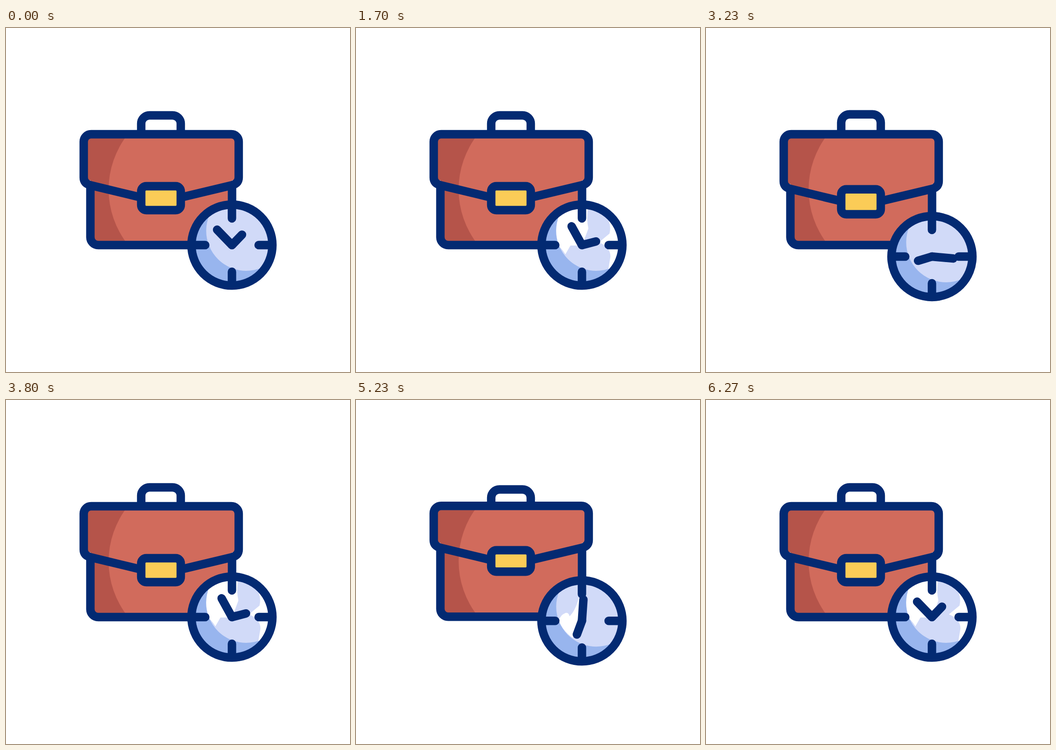
Animation of 748 by 748 pixels, one loop 6.3 s. Source, as an HTML page:

```html
<!DOCTYPE html>
<html lang="en">
<head>
<meta charset="utf-8">
<title>Briefcase and clock</title>
<style>
  html, body { margin: 0; width: 100%; height: 100%; overflow: hidden; background: #fff; }
  svg { display: block; width: 100vw; height: 100vh; }
  .line { fill: none; stroke: #032a72; stroke-width: 18.4; stroke-linejoin: round; }
  .round { stroke-linecap: round; }
  .red { fill: #d16b5c; }
  .dark { fill: #b5544a; }
</style>
</head>
<body>
<svg viewBox="0 0 748 748">
  <defs>
    <clipPath id="dial"><circle r="82"/></clipPath>
    <clipPath id="shine"><circle cx="31" cy="-31" r="87"/></clipPath>
  </defs>

  <g id="case">
    <path id="handle" class="line"/>
    <rect class="dark" x="183.5" y="231" width="308" height="241" rx="8"/>
    <rect id="flapLeft" class="dark" x="169" y="231" width="40"/>
    <path class="red" d="M265 231A193 193 0 0 0 265 471H491V231Z"/>
    <rect id="flapRight" class="red" x="470" y="231" width="36"/>
    <path id="body" class="line"/>
    <path id="flap" class="line"/>
    <rect id="clasp" class="line" x="294" width="86" rx="11" style="fill:#fbcc57"/>
  </g>

  <g id="clock">
    <circle r="88" fill="#98b5ee"/>
    <g clip-path="url(#dial)">
      <circle cx="31" cy="-31" r="87" fill="#d1daf8"/>
      <g clip-path="url(#shine)" fill="#fff">
        <path id="gaps" d="M-60-85H14Q9-58 14-36Q8-18-1 1H-25L-36 20Q-48 0-60 0Z
                           M45-72Q66-50 60-25L37-6Q62 5 62 25L57 55H90V-85Z"/>
        <path id="sweep" d="M-7-50Q-14-22-27-10Q-30-24-44-12L-51-2Q-42 22-20 37L0 0V-50Z"/>
      </g>
    </g>
    <circle class="line" r="88"/>
    <path class="line round" d="M0-84V-58M0 84V58M-84 0H-58M84 0H58"/>
    <path id="minute" class="line round" d="M0 0V-46.5"/>
    <path id="hour" class="line round" d="M0 0V-31.5"/>
  </g>
</svg>

<script>
const LOOP = 6300, CYCLE = 2100;
const $ = id => document.getElementById(id);

// Smooth step from 0 to 1 between two times
function ease(t, start, end) {
  const u = Math.min(1, Math.max(0, (t - start) / (end - start)));
  return u * u * (3 - 2 * u);
}

// The case hops up and drops back
const lift = t => -26 * (ease(t, 470, 850) - ease(t, 870, 1050));

// The flap lags: pulled up in the hop, thrown down after it, then at rest
const squash = t => ease(t, 455, 770) - 2 * ease(t, 870, 1335) + ease(t, 1345, 1700);

// The clock crouches, hops, lands low and recovers
const clockY = t => 472
  + 25 * (ease(t, 340, 570) - ease(t, 1150, 1310))
  - 56.5 * (ease(t, 570, 835) - ease(t, 850, 1133));

// A hand winds back, spins whole turns past its rest angle and settles
const spin = (t, rest, turns, back, over, start, end) => rest
  - back * ease(t, 100, start)
  + (360 * turns + back + over) * ease(t, start, end)
  - over * ease(t, end, 2050);

function drawCase(dy, k) {
  const up = 44 * k;
  const side = 325 - up, hem = 342 - up, tip = 368.5 - up;
  const top = 190 + 12 * k;
  const height = 52 - 12 * k;

  $('case').setAttribute('transform', `translate(0 ${dy})`);
  $('handle').setAttribute('d', `M294 231V${top + 18}a18 18 0 0 1 18-18H362a18 18 0 0 1 18 18V231`);
  $('body').setAttribute('d', `M183.5 ${hem}V455a17 17 0 0 0 17 17H491.5V${hem}`);
  $('flap').setAttribute('d',
    `M294 ${tip}L184 ${hem}Q169 ${hem - 4} 169 ${side}V247a16 16 0 0 1 16-16H490a16 16 0 0 1 16 16` +
    `V${side}Q506 ${hem - 4} 491 ${hem}L380 ${tip}`);
  for (const id of ['flapLeft', 'flapRight']) $(id).setAttribute('height', side + 6 - 231);
  $('clasp').setAttribute('y', 370 - 43 * k - height / 2);
  $('clasp').setAttribute('height', height);
}

const turn = (id, angle) => $(id).setAttribute('transform', `rotate(${angle})`);
const show = (id, on) => $(id).setAttribute('visibility', on ? 'visible' : 'hidden');

function draw() {
  const time = performance.now() % LOOP, t = time % CYCLE;

  drawCase(lift(t), squash(t));
  $('clock').setAttribute('transform', `translate(491.3 ${clockY(t)})`);
  turn('minute', spin(t, -44, 2, 14, 18, 382, 1582));
  turn('hour', spin(t, 44, 1, 27, 32, 487, 1674));
  show('gaps', t >= 1330 || (time >= CYCLE && t < 350));
  show('sweep', t >= 1000 && t < 1070);
  requestAnimationFrame(draw);
}
draw();
</script>
</body>
</html>
```
